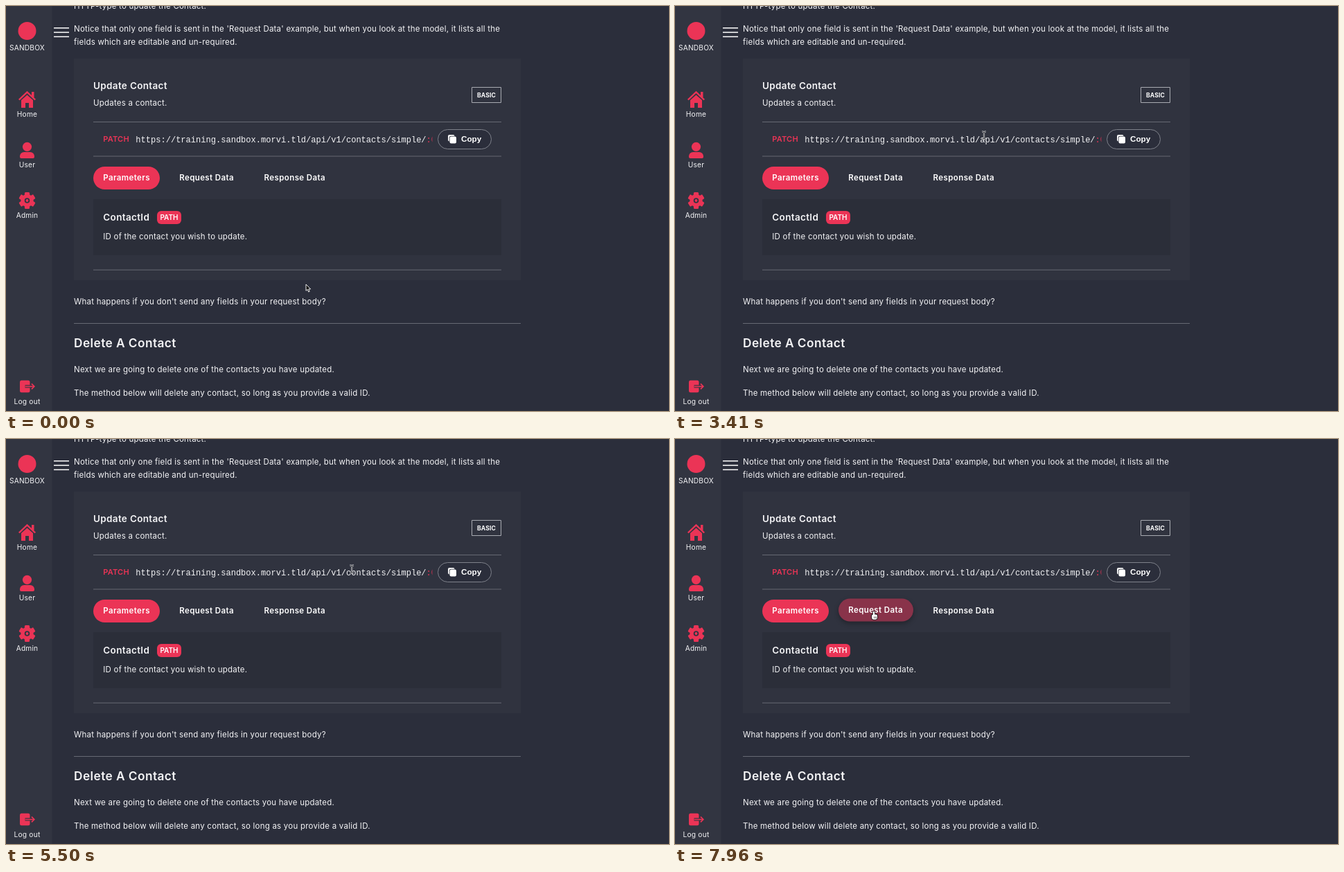
Write an HTML page with a canvas that moves like this. It is 957 px wide and 585 px high and loops after 8000 ms.

```html
<!DOCTYPE html>
<html lang="en">
<head>
<meta charset="utf-8">
<title>API guide</title>
<style>
  html, body { margin: 0; width: 100%; height: 100%; overflow: hidden; background: #2b2e3b; }
  canvas { display: block; width: 957px; height: 585px; }
</style>
</head>
<body>
<canvas id="stage"></canvas>
<script>
const W = 957, H = 585, LOOP = 8000, STEP = 58;
const canvas = document.getElementById('stage');
const ctx = canvas.getContext('2d');
const dpr = window.devicePixelRatio || 1;
canvas.width = W * dpr;
canvas.height = H * dpr;

const RED = '#eb3456', WHITE = '#fff', BG = '#2b2e3b', SIDE = '#323541',
  CARD = '#30333f', BOX = '#2b2e39', RULE = '#666973', INK = '#f4f4f6';
const SANS = 'Inter, sans-serif';
const ARIAL = '"Liberation Sans", sans-serif';
const MONO = '"Liberation Mono", monospace';

const clamp = v => Math.min(1, Math.max(0, v));
const ramp = (t, a, b) => clamp((t - a) / (b - a));

// Each move runs from the last end to `to`; without handles it is straight and eased.
const START = { x: 433, y: 402 };
const MOVES = [
  { from: 1770, until: 2530, to: { x: 319, y: 197 }, out: { x: 378, y: 318 }, into: { x: 230, y: 38 } },
  { from: 2590, until: 2760, to: { x: 330, y: 198 } },
  { from: 2940, until: 3410, to: { x: 446, y: 187 } },
  { from: 4490, until: 4730, to: { x: 520, y: 188 } },
  { from: 5350, until: 5670, to: { x: 467, y: 188 } },
  { from: 6150, until: 6840, to: { x: 246, y: 345 }, out: { x: 620, y: 215 }, into: { x: 430, y: 370 } },
  { from: 7440, until: 7960, to: { x: 287, y: 249 }, out: { x: 254, y: 350 }, into: { x: 287, y: 262 } }
];

// Share of a move done, held between screen updates.
function stepped(t, from, until) {
  if (t < from) return 0;
  const count = Math.round((until - from) / STEP) + 1;
  return t >= until ? 1 : Math.min(count - 1, Math.floor((t - from) / STEP) + 1) / count;
}

function bezier(a, b, c, d, p) {
  const q = 1 - p;
  return q * q * q * a + 3 * q * q * p * b + 3 * q * p * p * c + p * p * p * d;
}

function pointerAt(t) {
  let pos = START;
  for (const { from, until, to, out = pos, into = to } of MOVES) {
    if (t < from) break;
    const p = stepped(t, from, until);
    pos = { x: bezier(pos.x, out.x, into.x, to.x, p), y: bezier(pos.y, out.y, into.y, to.y, p) };
  }
  return pos;
}

function scrollAt(t) {
  const ease = p => p * (2 - p);
  return 64 * (ease(stepped(t, 3770, 4010)) - ease(stepped(t, 4960, 5250)));
}

function hoverAt(t) {
  return ramp(t, 2030, 2120) * ramp(t, 2320, 2120) + ramp(t, 7800, 7960);
}

function text(str, x, y, { size = 11.5, weight = 400, color = INK, track = 0.019, align = 'left', font = SANS } = {}) {
  ctx.font = `${weight} ${size}px ${font}`;
  ctx.letterSpacing = `${(size * track).toFixed(3)}px`;
  ctx.textAlign = align;
  ctx.fillStyle = color;
  ctx.fillText(str, x, y);
}

function rect(x, y, w, h, color) {
  ctx.fillStyle = color;
  ctx.fillRect(x, y, w, h);
}

function round(x, y, w, h, r) {
  ctx.beginPath();
  ctx.roundRect(x, y, w, h, r);
}

function pill(x, y, w, h, r, color) {
  round(x, y, w, h, r);
  ctx.fillStyle = color;
  ctx.fill();
}

function disc(r, color, y = 0) {
  ctx.beginPath();
  ctx.arc(0, y, r, 0, Math.PI * 2);
  ctx.fillStyle = color;
  ctx.fill();
}

function stroke(color, width) {
  ctx.strokeStyle = color;
  ctx.lineWidth = width;
  ctx.stroke();
}

function at(x, y, paint) {
  ctx.save();
  ctx.translate(x, y);
  paint();
  ctx.restore();
}

// A symmetric angle with its tip at the origin, opening along +y.
function chevron(w, h) {
  ctx.beginPath();
  ctx.moveTo(-w, h);
  ctx.lineTo(0, 0);
  ctx.lineTo(w, h);
}

function homeIcon() {
  rect(6.5, -11, 3.5, 8, RED);
  rect(-8.5, 1, 17, 11, RED);
  at(0, -6.5, () => {
    chevron(8.5, 7.5);
    ctx.fillStyle = RED;
    ctx.fill();
  });
  at(0, -10.5, () => {
    chevron(11.7, 11);
    stroke(RED, 2.4);
  });
  rect(-2.5, 5, 5, 7, SIDE);
}

function userIcon() {
  disc(6.6, RED, -4.7);
  pill(-10.5, 3, 21, 9, [6, 6, 2, 2], RED);
}

function gearIcon() {
  disc(9.2, RED);
  for (let i = 0; i < 6; i++) {
    pill(-3.6, -12, 7.2, 6, 1.5, RED);
    ctx.rotate(Math.PI / 3);
  }
  disc(3.8, SIDE);
  disc(1.9, RED);
}

function exitIcon() {
  pill(-10.5, -8.7, 14.5, 17.5, 2.5, RED);
  rect(-3, -2, 9, 4, SIDE);
  rect(-3, -0.8, 13, 1.7, RED);
  ctx.translate(10.3, 0);
  ctx.rotate(Math.PI / 2);
  chevron(3.9, 3.9);
  stroke(RED, 1.7);
}

function navItem(label, y, icon, gap = 25) {
  at(30.5, y, icon);
  text(label, 30.5, y + gap, { size: 10.2, align: 'center' });
}

function sidebar() {
  rect(0, 0, 66.5, H, SIDE);
  navItem('SANDBOX', 36, () => disc(13, RED), 28);
  navItem('Home', 135, homeIcon);
  navItem('User', 208, userIcon);
  navItem('Admin', 281, gearIcon);
  navItem('Log out', 549.5, exitIcon);
  for (let i = 0; i < 3; i++) rect(69, 31 + 6.3 * i, 22, 1.5, WHITE);
}

function heading(str, x, y, size = 13.5) {
  text(str, x, y, { size, weight: 600, track: 0.025 });
}

function prose() {
  text('HTTP-type to update the Contact.', 98, 3.5);
  text("Notice that only one field is sent in the 'Request Data' example, but when you look at the model, it lists all the", 98, 37);
  text('fields which are editable and un-required.', 98, 56);
  text("What happens if you don't send any fields in your request body?", 98, 430.7);
  rect(98, 458, 645, 1, RULE);
  heading('Delete A Contact', 98, 493.2, 17.3);
  text('Next we are going to delete one of the contacts you have updated.', 98, 529);
  text('The method below will delete any contact, so long as you provide a valid ID.', 98, 563);
}

function addressRow(scroll) {
  ctx.save();
  ctx.beginPath();
  ctx.rect(140, 170, 475.3, 45);
  ctx.clip();
  const path = 'https://training.sandbox.morvi.tld/api/v1/contacts/simple/';
  const mono = { size: 12.06, font: MONO, track: 0 };
  const x = 187.3 - scroll;
  text('PATCH', x - 47, 195.8, { size: 11, weight: 600, color: RED });
  text(path, x, 196.6, mono);
  text(':ContactId', x + ctx.measureText(path).width, 196.6, { ...mono, color: RED });
  ctx.restore();
}

function copyButton() {
  round(623.5, 178.5, 77, 28, 14);
  ctx.fillStyle = BG;
  ctx.fill();
  stroke('#7f828b', 1);
  pill(638, 186, 9.5, 9.5, 2, WHITE);
  round(640.5, 188.5, 9.5, 10, 2);
  stroke(BG, 1.6);
  pill(640.5, 188.5, 9.5, 10, 2, WHITE);
  text('Copy', 657, 196.3, { size: 11.7, weight: 700, color: WHITE, track: 0, font: ARIAL });
}

function tabs(hover) {
  const tab = { weight: 600, color: WHITE, track: 0.034 };
  const lift = 1.4 * hover;
  pill(126, 232, 96, 33, 16.5, RED);
  if (hover > 0) {
    ctx.save();
    ctx.shadowColor = `rgba(0,0,0,${0.3 * hover})`;
    ctx.shadowBlur = 7 * dpr;
    ctx.shadowOffsetY = 3 * dpr;
    pill(236, 232 - lift, 108, 33, 16.5, CARD);
    ctx.restore();
    ctx.globalAlpha = 0.48 * hover;
    pill(236, 232 - lift, 108, 33, 16.5, RED);
    ctx.globalAlpha = 1;
  }
  text('Parameters', 140.3, 252.2, tab);
  text('Request Data', 250.2, 252.2 - lift, tab);
  text('Response Data', 372.6, 252.2, tab);
}

function card(scroll, hover) {
  rect(98, 76, 645, 320, CARD);
  heading('Update Contact', 126, 120.3);
  text('Updates a contact.', 126, 144);
  round(672.5, 117.5, 42, 22, 0);
  stroke('#a9abb2', 1);
  text('BASIC', 693.5, 131.5, { size: 8.6, weight: 700, color: WHITE, align: 'center' });
  for (const y of [167, 216.5, 380.7]) rect(126, y, 589, 1, RULE);
  addressRow(scroll);
  copyButton();
  rect(126, 279, 589, 81, BOX);
  tabs(hover);
  heading('ContactId', 140.3, 309.6);
  pill(218, 296, 35, 19, 6, RED);
  text('PATH', 235.5, 309.3, { size: 10, weight: 600, color: WHITE, track: 0, align: 'center' });
  text('ID of the contact you wish to update.', 140.3, 336.5);
}

function arrowCursor() {
  const shape = new Path2D('M0 0V9.3L2.1 7.4L3.7 11L5.2 10.3L3.7 6.9H6.7Z');
  ctx.fillStyle = '#111';
  ctx.fill(shape);
  ctx.strokeStyle = WHITE;
  ctx.lineWidth = 0.9;
  ctx.stroke(shape);
}

function beamCursor() {
  ctx.beginPath();
  for (const side of [-1, 1]) {
    ctx.moveTo(-2.7, 5.6 * side);
    ctx.quadraticCurveTo(0, 5.6 * side, 0, 3.8 * side);
    ctx.quadraticCurveTo(0, 5.6 * side, 2.7, 5.6 * side);
  }
  ctx.moveTo(0, -4.5);
  ctx.lineTo(0, 4.5);
  stroke('#d8d9dd', 2.2);
  stroke('#15161b', 0.8);
}

function handCursor() {
  const parts = new Path2D();
  parts.roundRect(-1.2, 0, 2.4, 8, 1.2);
  parts.roundRect(-3, 4.4, 8, 7.4, [2, 2, 3, 3]);
  ctx.strokeStyle = '#111';
  ctx.lineWidth = 1.6;
  ctx.stroke(parts);
  ctx.fillStyle = WHITE;
  ctx.fill(parts);
  for (let i = 0; i < 3; i++) rect(0.2 + 1.6 * i, 7.4, 0.6, 2.8, '#333');
}

function cursorFor({ x, y }) {
  if (x > 140 && x < 615 && y > 184 && y < 203) return beamCursor;
  if (x > 236 && x < 344 && y > 231 && y < 265) return handCursor;
  return arrowCursor;
}

function draw(t) {
  ctx.setTransform(dpr, 0, 0, dpr, 0, 0);
  rect(0, 0, W, H, BG);
  sidebar();
  prose();
  card(scrollAt(t), hoverAt(t));
  const pos = pointerAt(t);
  at(pos.x, pos.y, cursorFor(pos));
}

const begin = performance.now();
function frame() {
  draw((performance.now() - begin) % LOOP);
  requestAnimationFrame(frame);
}
frame();
</script>
</body>
</html>
```
